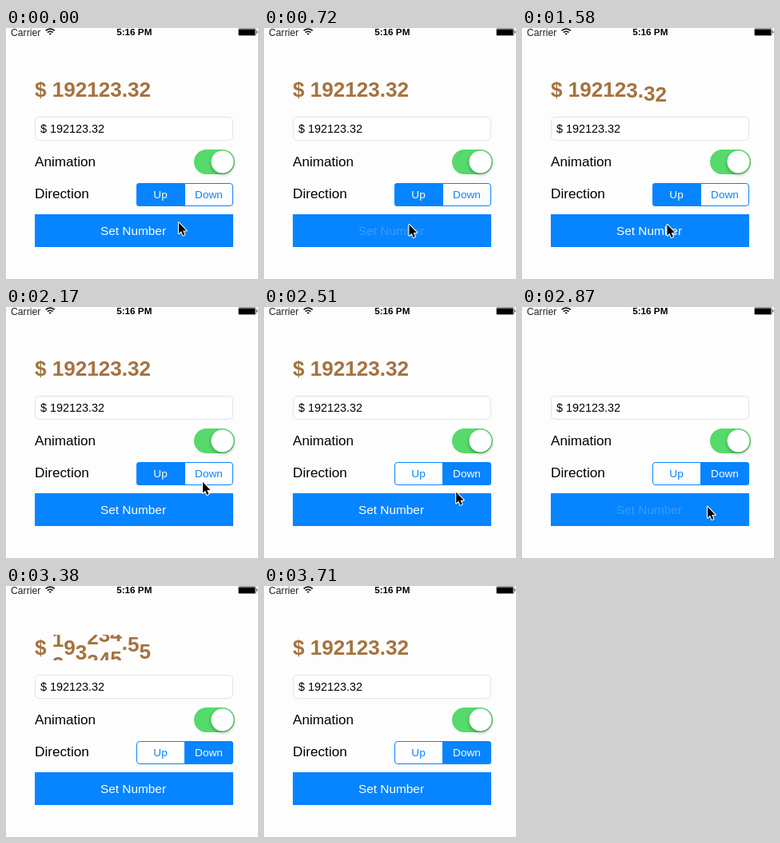
These frames come from a looping animation (315x314 px, 3750 ms). An HTML page with a canvas:

```html
<!DOCTYPE html>
<html lang="en">
<head>
<meta charset="utf-8">
<title>Scrolling number</title>
<style>
  html, body { margin: 0; width: 100%; height: 100%; overflow: hidden; background: #fdfdfd; }
  canvas { display: block; }
</style>
</head>
<body>
<canvas id="stage" width="315" height="314"></canvas>
<script>
const ctx = document.getElementById('stage').getContext('2d');
const LOOP = 3750, BLUE = '#0784ff', BROWN = '#a5733f', PAPER = '#fdfdfd';
const FAMILY = '"Liberation Sans", Arial, sans-serif';
const AMOUNT = '$ 192123.32';
const SIZE = 26.1, LINE = 31;
const PRESS = 150;

// Releasing the button starts a roll.
const rolls = [{ start: 890, dir: 1 }, { start: 2866, dir: -1 }];
const moves = [
  { from: 110, to: 540, x: 181.5, y: 246 },
  { from: 1690, to: 2170, x: 246, y: 219 },
  { from: 2400, to: 2650, x: 232, y: 250 },
  { from: 2870, to: 3300, x: 299, y: 325 },
];

const clamp = v => Math.max(0, Math.min(1, v));
const ease = v => (1 - Math.cos(Math.PI * clamp(v))) / 2;

function text(str, x, y, size, color, align = 'left', weight = '') {
  ctx.font = `${weight} ${size}px ${FAMILY}`;
  ctx.textAlign = align;
  ctx.fillStyle = color;
  ctx.fillText(str, x, y);
}

function box(x, y, w, h, radius, fill, stroke) {
  ctx.beginPath();
  ctx.roundRect(x, y, w, h, radius);
  if (fill) { ctx.fillStyle = fill; ctx.fill(); }
  if (stroke) { ctx.strokeStyle = stroke; ctx.lineWidth = 1; ctx.stroke(); }
}

function statusBar() {
  text('Carrier', 6, 9.5, 12.2, '#222');
  text('5:16 PM', 160.3, 9.3, 11.7, '#000', 'center', 'bold');

  ctx.strokeStyle = '#111';
  ctx.lineWidth = 1.7;
  for (let r = 1.5; r < 9; r += 3.2) {
    ctx.beginPath();
    ctx.arc(55.2, 9, r, -Math.PI * 0.75, -Math.PI * 0.25);
    ctx.stroke();
  }

  box(290.5, 0.5, 22, 9, 1, null, '#999');
  box(291, 1.5, 20.5, 7.5, 0.5, '#000');
  box(313, 3.5, 1.5, 3, 0.5, '#777');
}

// The glyphs a column passes through before it stops at char.
function stripFor(char, dir) {
  const strip = [char];
  if (/\d/.test(char)) {
    for (let d = +char - dir; d >= 0 && d <= 9; d -= dir) strip.unshift(d);
  }
  return strip;
}

function amount(t) {
  const { start, dir } = rolls.findLast(r => t >= r.start) ?? { start: -LOOP, dir: 1 };
  ctx.save();
  ctx.beginPath();
  ctx.rect(30, 61, 160, 32);
  ctx.clip();
  let x = 36;
  [...AMOUNT].forEach((char, column) => {
    const strip = stripFor(char, dir);
    const duration = 435 + 36 * column + 9 * strip.length;
    const position = strip.length * ease((t - start) / duration);
    strip.forEach((glyph, i) => {
      text(glyph, x, 86.3 + (i + 1 - position) * LINE * dir, SIZE, BROWN, 'left', 'bold');
    });
    x += ctx.measureText(char).width;
  });
  ctx.restore();
}

function toggle() {
  box(235, 152, 51, 31, 15.5, '#55da6b');
  ctx.save();
  ctx.shadowColor = 'rgba(0,0,0,.3)';
  ctx.shadowBlur = 4;
  ctx.shadowOffsetY = 2;
  box(256.5, 153.5, 28, 28, 14, '#fff');
  ctx.restore();
}

function segments(t) {
  const down = t >= 2400;
  const left = [3.5, 0, 0, 3.5], right = [0, 3.5, 3.5, 0];
  if (down) box(223, 194, 61, 29, right, BLUE);
  else {
    box(163, 194, 61, 29, left, BLUE);
    if (t >= 2290) box(223, 194, 61, 29, right, 'rgba(7,132,255,.15)');
  }
  box(163.5, 194.5, 120, 28, 3.5, null, BLUE);
  text('Up', 193, 212.8, 13.6, down ? BLUE : PAPER, 'center');
  text('Down', 253.5, 212.8, 13.6, down ? PAPER : BLUE, 'center');
}

function button(t) {
  const roll = rolls.findLast(r => t >= r.start - PRESS - 25);
  const alpha = roll ? 0.2 + 0.8 * ease((t - roll.start) / 350) : 1;
  ctx.fillStyle = BLUE;
  ctx.fillRect(36, 233, 248, 41);
  text('Set Number', 159, 258.7, 15.4, `rgba(255,255,255,${alpha})`, 'center');
}

function cursor(t) {
  let x = 216, y = 243.5;
  for (const move of moves) {
    const k = ease((t - move.from) / (move.to - move.from));
    x += (move.x - x) * k;
    y += (move.y - y) * k;
  }
  const arrow = new Path2D('M0 0V13.6L3.1 10.8 5.2 15.9 7.4 15 5.2 10H9.5Z');
  ctx.save();
  ctx.translate(x, y);
  ctx.lineJoin = 'round';
  ctx.strokeStyle = '#fff';
  ctx.lineWidth = 2.2;
  ctx.stroke(arrow);
  ctx.fillStyle = '#000';
  ctx.fill(arrow);
  ctx.restore();
}

function draw(now) {
  const t = now % LOOP;
  ctx.fillStyle = PAPER;
  ctx.fillRect(0, 0, 315, 314);
  statusBar();
  amount(t);
  box(36.5, 111.5, 247, 29, 5, '#fff', '#e2e2e2');
  text(AMOUNT, 43, 130.8, 14.4, '#000');
  text('Animation', 36, 172.7, 17.1, '#000');
  text('Direction', 36, 213, 17.2, '#000');
  toggle();
  segments(t);
  button(t);
  cursor(t);
}

const begin = performance.now();
function tick() {
  draw(performance.now() - begin);
  requestAnimationFrame(tick);
}
tick();
</script>
</body>
</html>
```
